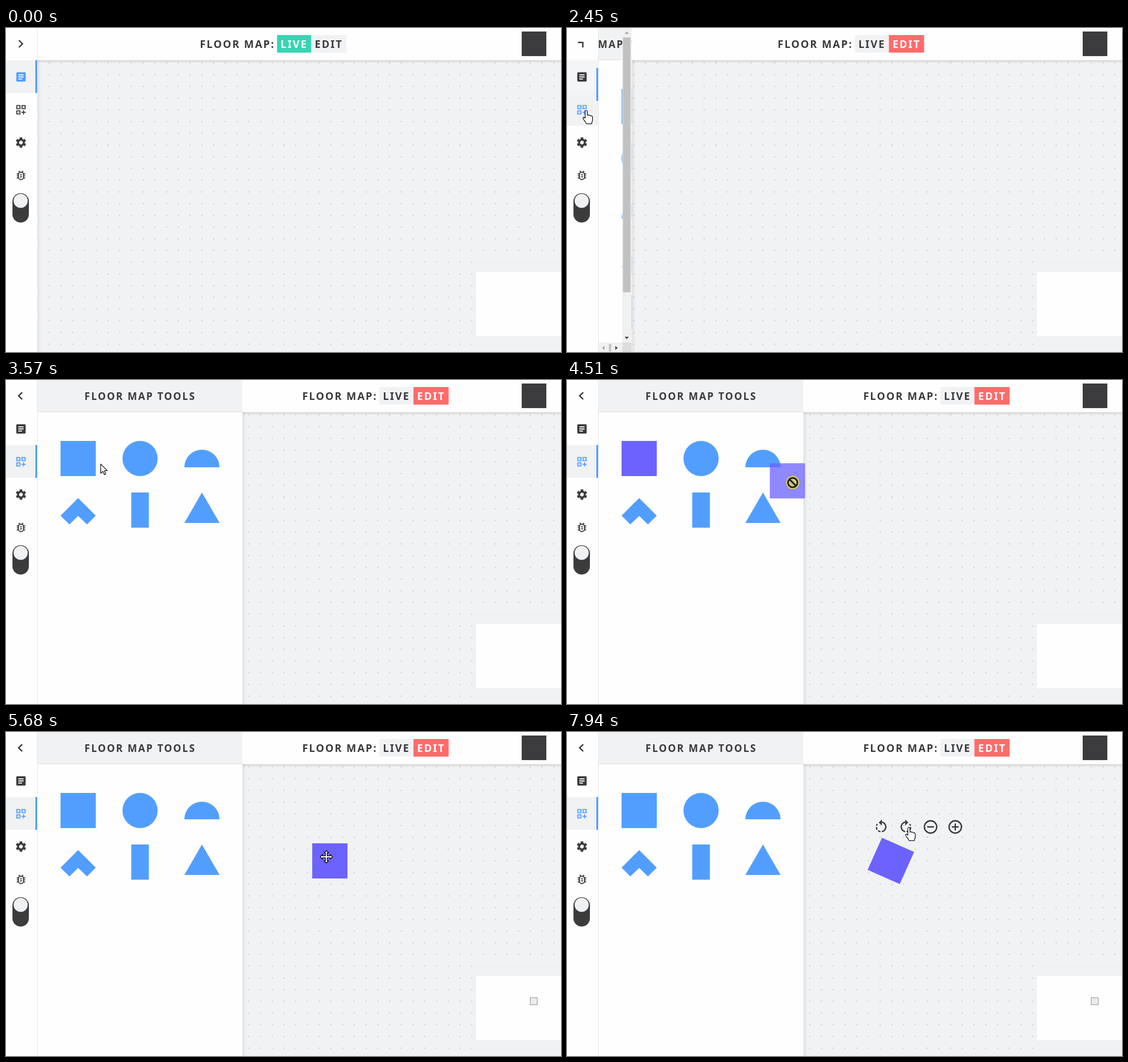
An HTML page for the animation above (8000 ms loop, 946x553 px).

```html
<!DOCTYPE html>
<html lang="en">
<head>
<meta charset="utf-8">
<title>Floor map editor</title>
<style>
  html, body { margin: 0; width: 100%; height: 100%; overflow: hidden; background: #fefefe; }
  #stage { display: block; width: 946px; height: 553px; }
  text { font: 700 17.6px "Noto Sans", "Open Sans", sans-serif; letter-spacing: 2px; fill: #3a3a3c; }
  #panelTitle { font-size: 17px; }
  .line { fill: none; stroke: currentColor; stroke-width: 2; }
  .solid { fill: currentColor; }
  .icon { color: #3a3a3c; }
  .cursor { fill: #fff; stroke: #000; stroke-width: 1.1; stroke-linejoin: round; }
  .shape { fill: #529eff; }
</style>
</head>
<body>
<svg id="stage" viewBox="0 0 946 553">
  <defs>
    <pattern id="dots" x="63.8" y="49.7" width="20" height="20" patternUnits="userSpaceOnUse">
      <circle cx="10" cy="10" r=".9" fill="#b9babe"/>
    </pattern>
    <linearGradient id="fadeDown" x2="0" y2="1">
      <stop stop-color="#000" stop-opacity=".13"/><stop offset="1" stop-color="#000" stop-opacity="0"/>
    </linearGradient>
    <linearGradient id="fadeRight">
      <stop stop-color="#000" stop-opacity=".07"/><stop offset="1" stop-color="#000" stop-opacity="0"/>
    </linearGradient>
    <g id="article"><path class="solid" fill-rule="evenodd" d="M5 3H19a2 2 0 0 1 2 2V19a2 2 0 0 1-2 2H5a2 2 0 0 1-2-2V5a2 2 0 0 1 2-2zM7 7v2h10V7zM7 11v2h10v-2zM7 15v2h7v-2z"/></g>
    <g id="widgets"><path class="line" d="M4 4h6v6H4zM14 4h6v6h-6zM4 14h6v6H4zM17 13v8M13 17h8"/></g>
    <g id="gear" transform="rotate(30 12 12)">
      <circle class="line" cx="12" cy="12" r="5.5" style="stroke-width:4"/>
      <circle class="line" cx="12" cy="12" r="8.5" pathLength="6" stroke-dasharray=".56 .44" stroke-dashoffset=".28" style="stroke-width:3"/>
    </g>
    <g id="bug">
      <rect class="line" x="7" y="6" width="10" height="14" rx="5"/>
      <path class="line" d="M10 11h4M10 15h4M4 9h3M17 9h3M4 13h3M17 13h3M4 17h3M17 17h3M7.7 3.7l2.6 2.6M16.3 3.7l-2.6 2.6"/>
    </g>
    <g id="rotate">
      <path class="line" d="M13 5.1A7 7 0 0 1 13 18.9"/>
      <path class="line" d="M11 18.9A7 7 0 0 1 6.4 7.8" stroke-dasharray="3.7 2.1"/>
      <path class="solid" d="M13 1v9L8.45 5.55z"/>
    </g>
    <g id="minus"><circle class="line" cx="12" cy="12" r="9"/><path class="line" d="M7 12h10"/></g>
    <g id="plus"><use href="#minus"/><path class="line" d="M12 7v10"/></g>
  </defs>

  <rect width="946" height="553" fill="#f1f2f4"/>
  <rect x="53" y="55" width="893" height="498" fill="url(#dots)"/>
  <rect x="797" y="396" width="149" height="150" fill="#f0f1f3"/>
  <rect x="801" y="416" width="145" height="110" fill="#fefefe"/>
  <g id="placed">
    <rect x="893.5" y="453.5" width="12" height="12" fill="#ebebeb" stroke="#9a9a9a"/>
    <rect id="node" x="522" y="190" width="60" height="60" fill="#6c63ff"/>
  </g>
  <g id="actions" class="icon"></g>

  <rect x="53" width="893" height="55" fill="#fefefe"/>
  <rect x="53" y="55" width="893" height="5" fill="url(#fadeDown)"/>
  <rect x="879" y="6" width="42" height="42" fill="#3c3c3e"/>
  <g id="title">
    <text x="330.4" y="34">FLOOR MAP:</text>
    <rect id="liveBox" x="462" y="12" width="58" height="30"/>
    <rect id="editBox" x="520" y="12" width="60" height="30"/>
    <text id="live" x="468" y="34">LIVE</text>
    <text id="edit" x="526.3" y="34">EDIT</text>
  </g>

  <rect id="panelShade" y="55" width="7" height="498" fill="url(#fadeRight)"/>
  <svg id="panel" x="53" height="553">
    <rect width="350" height="553" fill="#fefefe"/>
    <rect width="350" height="55" fill="#f1f2f4"/>
    <rect y="54" width="350" height="1" fill="#e3e4e6"/>
    <text id="panelTitle" y="34" text-anchor="middle">FLOOR MAP TOOLS</text>
    <g id="shapes">
      <rect class="shape" width="60" height="60"/>
      <circle class="shape" cx="30" cy="30" r="30"/>
      <path class="shape" d="M0 45a30 30 0 0 1 60 0z"/>
      <path class="shape" d="M30 9.6L60 39.6 45 54.6 30 40 15 54.6 0 39.6z"/>
      <rect class="shape" x="15" width="30" height="60"/>
      <path class="shape" d="M30 0L60 52H0z"/>
    </g>
    <g id="scrollY">
      <rect width="16" height="553" fill="#f1f1f1"/>
      <rect x="1" y="16" width="13" height="435" fill="#c1c1c1"/>
      <path d="M4 10l3.5-4 3.500 4z" fill="#a3a3a3"/>
      <path d="M4 527l3.500 4 3.500-4z" fill="#404040"/>
    </g>
    <g id="scrollX">
      <rect y="537" width="350" height="16" fill="#f1f1f1"/>
      <rect id="thumbX" x="18.500" y="539" height="13" fill="#c1c1c1"/>
      <path d="M11 542.500v7l-4-3.500z" fill="#a3a3a3"/>
      <g id="endX">
        <path d="M-28 542.500v7l4-3.500z" fill="#404040"/>
        <rect x="-16" y="537" width="16" height="16" fill="#dcdcdc"/>
      </g>
    </g>
  </svg>

  <rect width="53" height="553" fill="#fefefe"/>
  <rect id="articleBg" y="55" width="53" height="56" fill="#f1f2f4"/>
  <rect id="widgetsBg" y="111" width="53" height="56" fill="#f1f2f4"/>
  <rect x="53" width="1" height="553" fill="#e6e7e9"/>
  <rect id="marker" x="50" width="3" height="56" fill="#529eff"/>
  <path id="chevron" class="icon line" d="M22 21l6 6-6 6" style="stroke-width:2.4"/>
  <g id="menu" class="icon"></g>
  <rect x="11" y="282" width="28" height="50" rx="14" fill="#3c3c3c"/>
  <circle cx="25" cy="295" r="12" fill="#f0f1f3"/>

  <rect id="ghost" width="60" height="60" fill="#6c63ff" opacity=".76"/>
  <g id="cursors">
    <path id="arrow" class="cursor" d="M.5.5V16.500L4.200 13 6.700 18.800 9.100 17.700 6.700 12H11.800z"/>
    <path id="hand" class="cursor" d="M-1 13V1.500a1.800 1.800 0 0 1 3.600 0V8c.5-1 3-1 3.200.5 .8-.9 2.700-.6 3 .8 1-.6 2.700 0 2.700 1.700V16c0 2.500-1.500 3.500-1.500 6.500H1c-.5-2.500-3-4.500-5.500-8.500-1.200-2 .8-3.300 2-2.200z"/>
    <path id="move" class="cursor" d="M0-10.500L4-6.500H1.500V-1.500H6.500V-4L10.500 0 6.500 4V1.500H1.500V6.500H4L0 10.500-4 6.500H-1.500V1.500H-6.500V4L-10.500 0-6.500-4V-1.500H-1.500V-6.500H-4z"/>
    <g id="noDrop">
      <circle r="11.500" fill="#d3c968"/>
      <circle r="8" fill="#d0c98a" stroke="#23220c" stroke-width="2.800"/>
      <path d="M-5.600-5.600L5.600 5.600" stroke="#23220c" stroke-width="3"/>
    </g>
  </g>
</svg>
<script>
const LOOP = 8000;
const BLUE = '#529eff', PURPLE = '#6c63ff', DARK = '#3a3a3c', PALE = '#f1f2f4';
const $ = id => document.getElementById(id);
const set = (el, attrs) => { for (const k in attrs) el.setAttribute(k, attrs[k]); };
const show = (el, on) => el.setAttribute('visibility', on ? 'visible' : 'hidden');
const clamp = (v, lo, hi) => Math.min(hi, Math.max(lo, v));
const ease = (t, start, length) => (1 - Math.cos(Math.PI * clamp((t - start) / length, 0, 1))) / 2;

function addIcon(parent, name, x, y, scale, flip = 1) {
  const use = document.createElementNS('http://www.w3.org/2000/svg', 'use');
  set(use, { href: '#' + name, transform: `translate(${x} ${y}) scale(${scale * flip} ${scale}) translate(-12 -12)` });
  return parent.appendChild(use);
}
const menu = ['article', 'widgets', 'gear', 'bug'].map((name, i) => addIcon($('menu'), name, 25.5, 83.5 + 56 * i, 0.89));
['rotate', 'rotate', 'minus', 'plus'].forEach((name, i) =>
  addIcon($('actions'), name, 535.5 + 42.1 * i, 162, 1.17, i === 1 ? -1 : 1));

// Pointer path: time, x, y
const path = [
  [140, 365, 504], [500, 160, 262], [910, 45, 128], [990, 42, 124], [1200, 31, 131], [1450, 33, 141],
  [2140, 33, 141], [2150, 32, 141], [2850, 32, 141], [3010, 72, 143], [3160, 118, 147], [3330, 203, 152],
  [3420, 203, 150], [3650, 139, 139], [3800, 132, 136], [4340, 132, 136], [4350, 159, 154],
  [4510, 384, 175], [4600, 450, 183], [4830, 523, 191], [5500, 523, 191], [5680, 546, 213],
  [6140, 546, 213], [6230, 546, 219], [6500, 546, 219], [6780, 582, 163]
];
function pointerAt(t) {
  const i = path.findIndex(p => p[0] > t);
  if (i < 0) return path[path.length - 1].slice(1);
  if (i === 0) return path[0].slice(1);
  const [a, b] = [path[i - 1], path[i]], k = (t - a[0]) / (b[0] - a[0]);
  return [a[1] + (b[1] - a[1]) * k, a[2] + (b[2] - a[2]) * k];
}
function cursorKind(t, x, y, hovered) {
  if (t < 140) return '';
  if (t < 950) return 'arrow';
  if (t < 2900) return 'hand';
  if (t < 4350) return hovered >= 0 ? 'move' : 'arrow';
  if (t < 5070) return x < 403 ? 'noDrop' : 'arrow';
  if (y < 175 && t > 6500) return 'hand';
  return y < 190 ? 'arrow' : 'move';
}

function drawPanel(t, hovered) {
  const w = 350 * ease(t, 2364, 328);
  const cols = clamp(Math.floor((w - 52) / 88), 1, 3);
  const tall = cols === 1, narrow = w < 156;
  const bar = tall ? 16 : 0;
  const gap = cols > 1 ? (w - 139) / (cols - 1) : 0;
  show($('panel'), w > 0.5);
  set($('panel'), { width: Math.max(w, 0.1) });
  set($('panelShade'), { x: 53 + w });
  set($('panelTitle'), { x: (w - bar) / 2 + 0.7 });
  set($('title'), { transform: `translate(${w / 2 - (w > 349 ? 0.5 : 0)})` });
  [...$('shapes').children].forEach((shape, i) => {
    set(shape, { transform: `translate(${40 + gap * (i % cols)} ${104 + 88 * Math.floor(i / cols)})` });
    const held = i === 0 && t >= 4350 && t < 5110;
    shape.style.fill = held || i === hovered ? PURPLE : BLUE;
  });
  $('scrollY').style.display = tall ? '' : 'none';
  $('scrollX').style.display = narrow ? '' : 'none';
  set($('scrollY'), { transform: `translate(${w - 16})` });
  set($('endX'), { transform: `translate(${w})` });
  set($('thumbX'), { width: Math.max(3, (w - 48) * 0.4) });
}

function drawMenu(t) {
  const editing = t >= 2300, turn = ease(t, 2350, 310);
  menu[0].style.color = editing ? DARK : BLUE;
  menu[1].style.color = t >= 950 ? BLUE : DARK;
  set($('articleBg'), { opacity: 1 - turn });
  set($('widgetsBg'), { opacity: clamp((t - 950) / 250, 0, 1) });
  set($('marker'), { y: 55 + 56 * turn });
  set($('chevron'), { transform: `rotate(${-180 * turn} 24.8 27)` });
  set($('liveBox'), { fill: editing ? PALE : '#36d6b2' });
  set($('editBox'), { fill: editing ? '#ff6b6b' : PALE });
  $('live').style.fill = editing ? DARK : '#fff';
  $('edit').style.fill = editing ? '#fff' : DARK;
}

function draw(t) {
  const [x, y] = pointerAt(t);
  const browsing = t > 2850 && t < 4350;
  const hovered = !browsing ? -1 : x >= 93 && x < 153 ? 0 : x >= 199 ? 1 : -1;
  drawMenu(t);
  drawPanel(t, hovered);
  show($('placed'), t >= 5070);
  show($('actions'), t >= 6150);
  set($('node'), { transform: `rotate(${15 * (ease(t, 7200, 290) + ease(t, 7777, 290))} 552 220)` });
  show($('ghost'), t >= 4350 && t < 5070);
  set($('ghost'), { x: x - 39, y: y - 33 });
  const kind = cursorKind(t, x, y, hovered);
  for (const cursor of $('cursors').children) show(cursor, cursor.id === kind);
  set($('cursors'), { transform: `translate(${x} ${y})` });
}

const start = performance.now();
function tick() {
  draw((performance.now() - start) % LOOP);
  requestAnimationFrame(tick);
}
tick();
</script>
</body>
</html>
```
